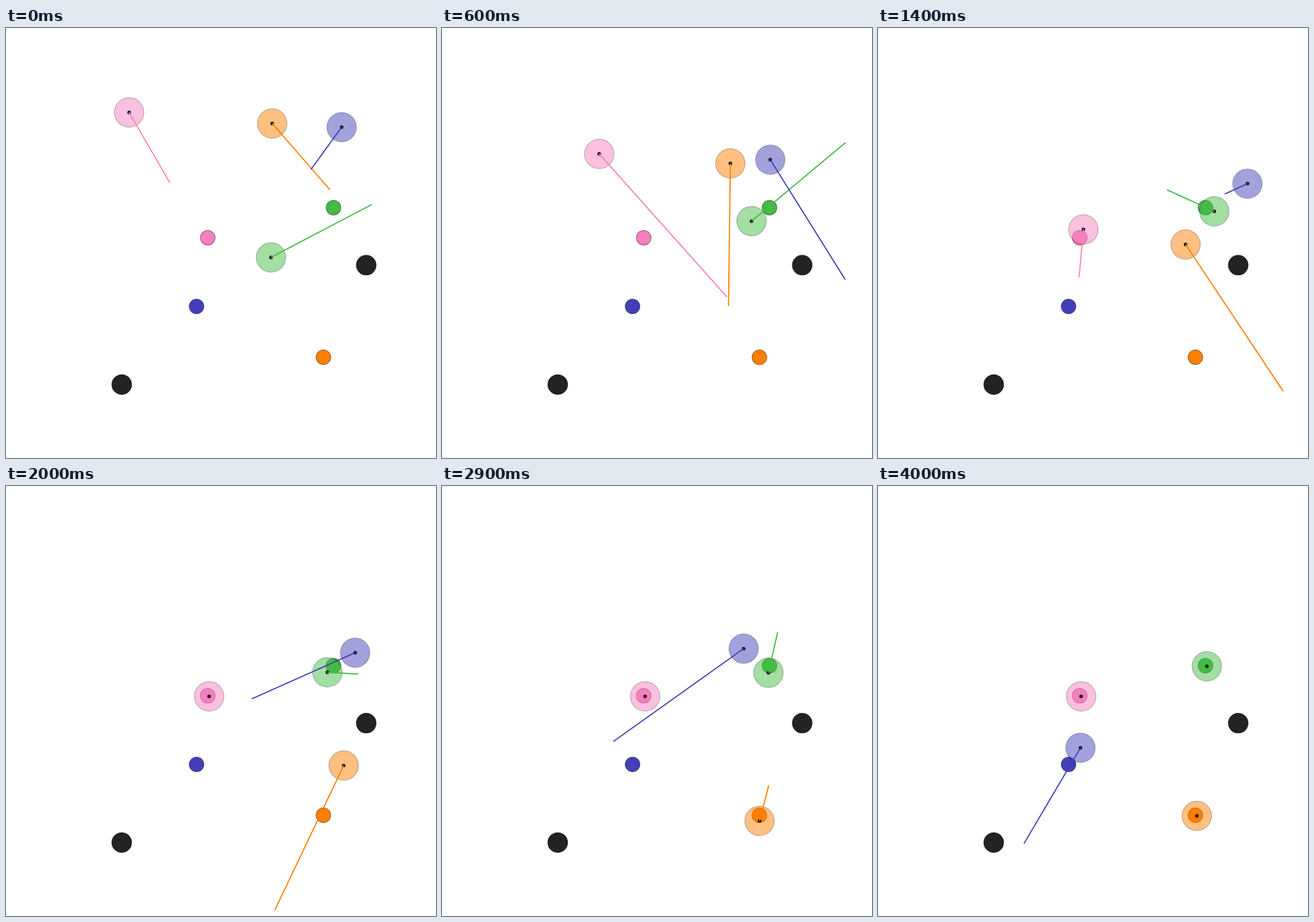
Recreate the animation shown at these times as an HTML page. Size 700 by 700 pixels, loop 4.1 s.

```html
<!DOCTYPE html>
<html lang="en">
<head>
<meta charset="utf-8">
<title>Agents and goals</title>
<style>
  html, body { margin: 0; width: 100%; height: 100%; overflow: hidden; background: #fff; }
  svg { display: block; width: 100vw; height: 100vh; }
</style>
</head>
<body>
<svg id="stage" viewBox="-0.4 -0.4 700 700"></svg>
<script>
const LOOP = 4100, STEP = 100;
const GAIN = 0.075;                          // pixels moved per step for each pixel of velocity line
const TIMES = [0, 6, 14, 20, 29, 36, 40];    // steps at which waypoints are reached
const REST = [2.3, 1];                       // where an agent settles, relative to its goal

// Waypoints: x, y, velocity x, velocity y. After the last one the agent settles.
const agents = [
  { color: '#f77fbd', goal: [328, 341], way: [
    [200, 137, 66, 114], [255.5, 204.5, 208, 233], [334, 327.5, -7, 78]] },
  { color: '#ff7f00', goal: [516.3, 535.6], way: [
    [433, 155, 94, 108], [469, 220, -3, 232], [500.3, 352, 159, 239],
    [549.3, 454.7, -112, 235], [516.5, 544.8, 15, -58]] },
  { color: '#44bb44', goal: [532.7, 292], way: [
    [431, 373, 164, -86], [503.5, 314, 153, -128], [547, 298, -77, -35],
    [522.8, 302.8, 50, 3], [531, 303.7, 15, -66]] },
  { color: '#433fb8', goal: [309.8, 452.8], way: [
    [546, 161, -50, 69], [534, 214, 122, 195], [601, 253, -37, 17],
    [568, 271, -168, 75], [490.7, 264.4, -212, 151], [381.7, 357.2, -227, 239],
    [329.2, 425.8, -92, 156]] }
];
const obstacles = [[188, 580], [586, 385.7]];

const stage = document.getElementById('stage');

function set(el, attrs) {
  for (const name in attrs) el.setAttribute(name, attrs[name]);
}

function add(tag, attrs) {
  const el = document.createElementNS('http://www.w3.org/2000/svg', tag);
  set(el, attrs);
  return stage.appendChild(el);
}

const disc = (x, y, r, fill, edge) => add('circle', {
  cx: x, cy: y, r, fill, stroke: '#000', 'stroke-opacity': edge, 'stroke-width': 1.5
});

obstacles.forEach(([x, y]) => disc(x, y, 16, '#222422', 0.6));
agents.forEach(a => disc(...a.goal, 12, a.color, 0.35));
agents.forEach(a => {
  a.rest = [a.goal[0] + REST[0], a.goal[1] + REST[1], 0, 0];
  a.body = disc(0, 0, 24, a.color, 0.22);
  set(a.body, { 'fill-opacity': 0.49 });
});
agents.forEach(a => {
  a.dot = add('circle', { r: 2.2, fill: '#333', stroke: '#111', 'stroke-width': 1.4 });
  a.line = add('line', { stroke: a.color, 'stroke-width': 1.9 });
});

// Hermite position, and a velocity that arches through the mean speed
function axis(p0, p1, v0, v1, span, s) {
  const d = p1 - p0, m0 = v0 * GAIN * span, m1 = v1 * GAIN * span;
  const pos = p0 + s * (m0 + s * (3 * d - 2 * m0 - m1 + s * (m0 + m1 - 2 * d)));
  const mean = d / span / GAIN;
  const vel = v0 + (v1 - v0) * s + 4 * s * (1 - s) * (mean - (v0 + v1) / 2);
  return [pos, vel];
}

function pose({ way, rest }, n) {
  let i = 0;
  while (i < TIMES.length - 2 && n >= TIMES[i + 1]) i++;
  const a = way[i] || rest, b = way[i + 1] || rest;
  const span = TIMES[i + 1] - TIMES[i], s = (n - TIMES[i]) / span;
  const [x, vx] = axis(a[0], b[0], a[2], b[2], span, s);
  const [y, vy] = axis(a[1], b[1], a[3], b[3], span, s);
  return { x, y, vx, vy };
}

function draw(ms) {
  const n = Math.floor((ms % LOOP) / STEP);
  for (const a of agents) {
    const { x, y, vx, vy } = pose(a, n);
    set(a.body, { cx: x, cy: y });
    set(a.dot, { cx: x, cy: y });
    set(a.line, { x1: x, y1: y, x2: x + vx, y2: y + vy });
  }
}

let start;
function tick(now) {
  if (start === undefined) start = now;
  draw(Math.max(0, now - start));
  requestAnimationFrame(tick);
}
draw(0);
requestAnimationFrame(tick);
</script>
</body>
</html>
```
